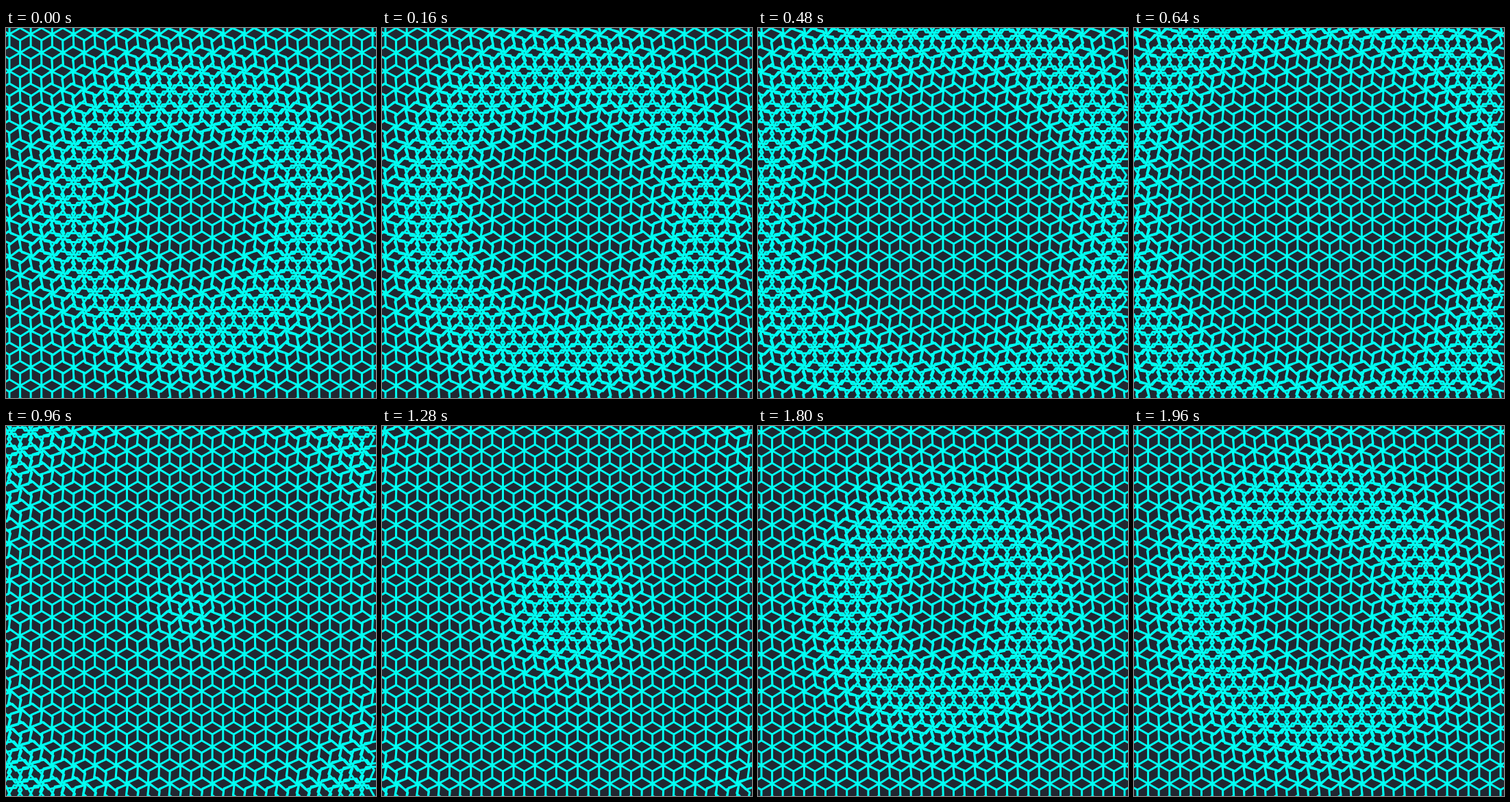
Recreate the animation shown at these times as an HTML page. Size 540 by 540 pixels, loop 2000 ms.

```html
<!DOCTYPE html>
<html lang="en">
<head>
<meta charset="utf-8">
<title>Turning hexagons</title>
<style>
  html, body { margin: 0; width: 100%; height: 100%; overflow: hidden; background: #202731; }
  svg { display: block; width: 100vw; height: 100vh; }
</style>
</head>
<body>
<svg viewBox="0 0 540 540">
  <path id="lines" fill="none" stroke="#00fff2" stroke-width="3" stroke-linejoin="round"/>
</svg>
<script>
const LOOP = 2000, STEP = 40;
const START = 305, TURN_TIME = 1650, SPEED = 0.2;
const CENTER = 270, RADIUS = 18;
const HALF = RADIUS * Math.sqrt(3) / 2;
const lines = document.getElementById('lines');

// Two overlapping honeycombs: one hexagon above and one below each lattice point.
const hexagons = [];
for (let row = -11; row <= 11; row++) {
  for (let col = -9; col <= 8; col++) {
    const x = (col * 2 + Math.abs(row % 2)) * HALF;
    for (const side of [-1, 1]) {
      const y = row * RADIUS * 1.5 + (side - 1) * RADIUS;
      hexagons.push({ x: x + CENTER, y: y + CENTER, delay: Math.hypot(x, y) / SPEED });
    }
  }
}

const ease = p => (1 - Math.cos(Math.PI * p)) / 2;

// A sixth of a turn brings a hexagon back onto itself.
function turn(time, delay) {
  const local = ((time - START - delay) % LOOP + 2 * LOOP) % LOOP;
  return -Math.PI / 3 * ease(Math.min(1, local / TURN_TIME));
}

function outline({ x, y, delay }, time) {
  const start = Math.PI / 2 + turn(time, delay);
  const corners = [];
  for (let i = 0; i < 6; i++) {
    const a = start + i * Math.PI / 3;
    corners.push((x + RADIUS * Math.cos(a)).toFixed(2) + ' ' + (y + RADIUS * Math.sin(a)).toFixed(2));
  }
  return 'M' + corners.join('L') + 'Z';
}

let shown = -1;
function draw(time) {
  const t = Math.floor((time % LOOP) / STEP) * STEP;
  if (t === shown) return;
  shown = t;
  lines.setAttribute('d', hexagons.map(h => outline(h, t)).join(''));
}

const begin = performance.now();
function tick() {
  draw(performance.now() - begin);
  requestAnimationFrame(tick);
}
tick();
</script>
</body>
</html>
```
